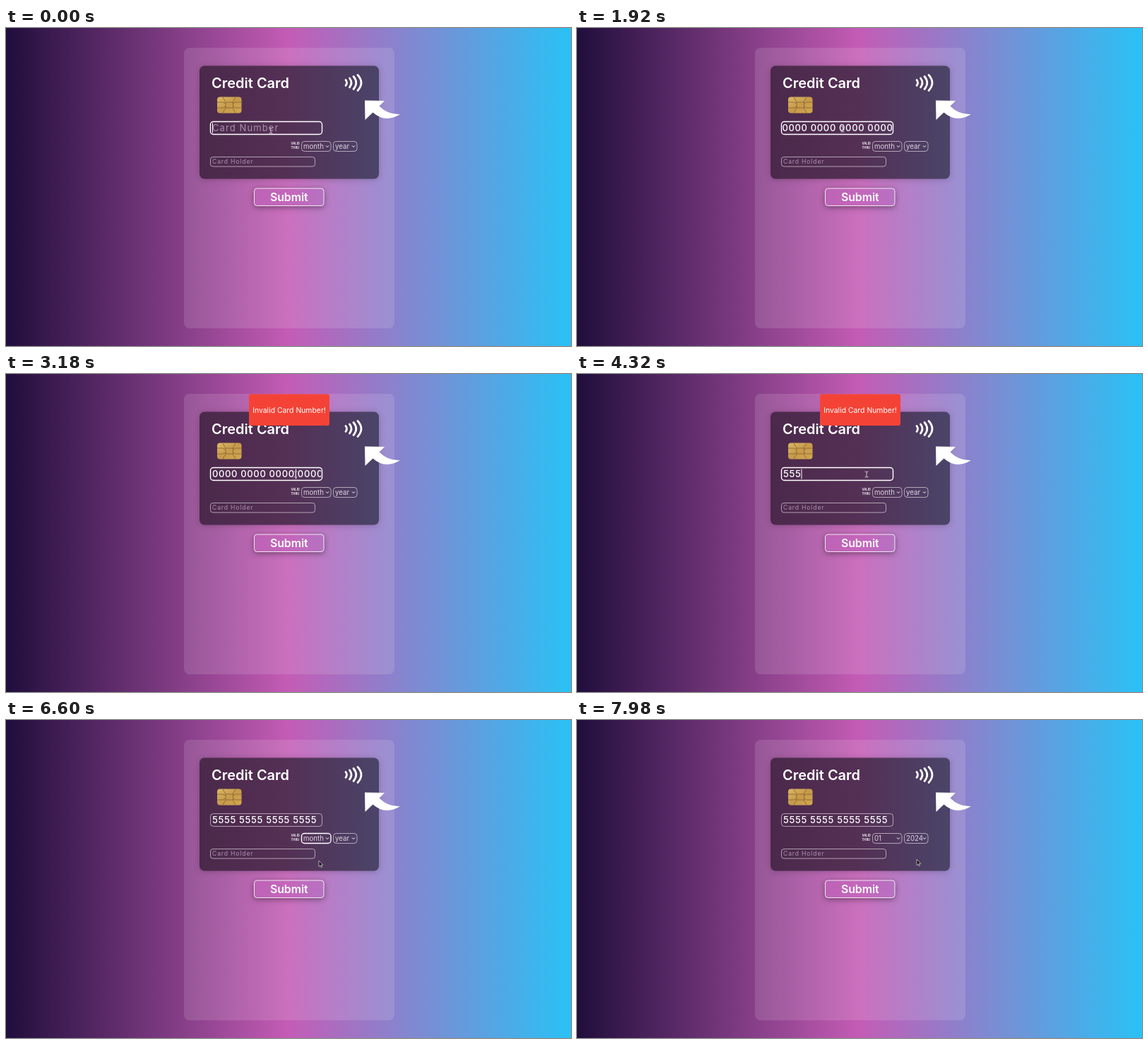
Write an HTML page that moves like this. It is 800 px wide and 450 px high and loops after 8000 ms.

```html
<!DOCTYPE html>
<html lang="en">
<head>
<meta charset="utf-8">
<title>Credit card form</title>
<style>
  html, body { margin: 0; width: 100%; height: 100%; overflow: hidden; }
  svg { display: block; width: 100vw; height: 100vh; }
  text { font-family: Inter, "Noto Sans", sans-serif; fill: #fff; }
  .bold { font-weight: 600; }
  .tiny { font-size: 4.2px; font-weight: 600; }
  .option { font-size: 9.7px; fill: #ddd3df; }
  .number { font-size: 13px; font-weight: 500; letter-spacing: .65px; }
  .number.empty { font-weight: 400; letter-spacing: 1.1px; }
  .empty { fill: #a88fac; }
  .field { fill: none; stroke: #fff; stroke-opacity: .55; }
  .field.focus { stroke-opacity: 1; stroke-width: 1.4; }
  #card { filter: drop-shadow(0 1px 4px #0003); }
  #button { filter: drop-shadow(0 2px 4px #0006); }
</style>
</head>
<body>
<svg viewBox="0 0 800 450">
  <defs>
    <linearGradient id="sky">
      <stop stop-color="#200e3c"/><stop offset=".5" stop-color="#c45cb5"/><stop offset="1" stop-color="#2ac1f5"/>
    </linearGradient>
    <linearGradient id="dark">
      <stop stop-color="#4b294b"/><stop offset=".5" stop-color="#543055"/><stop offset="1" stop-color="#4b4469"/>
    </linearGradient>
    <linearGradient id="pink">
      <stop stop-color="#bd63b6"/><stop offset=".5" stop-color="#c566bc"/><stop offset="1" stop-color="#b672c2"/>
    </linearGradient>
    <linearGradient id="gold" x2="1" y2="1">
      <stop stop-color="#dcb864"/><stop offset=".5" stop-color="#c69a4b"/><stop offset="1" stop-color="#d2a850"/>
    </linearGradient>
    <clipPath id="inside"><rect x="291" y="133" width="155" height="17"/></clipPath>
  </defs>

  <rect width="800" height="450" fill="url(#sky)"/>
  <rect x="252" y="28" width="298" height="397" rx="8" fill="#fff" fill-opacity=".12"/>
  <rect id="card" x="274" y="53.5" width="254" height="160" rx="7" fill="url(#dark)"/>

  <text class="bold" x="291" y="84.5" font-size="20">Credit Card</text>
  <g fill="none" stroke="#fff" stroke-width="2.8" stroke-linecap="round">
    <path d="M481 73.5q3 4 0 8M486.5 71q5 6.500 0 13M492 68.500q7.500 9 0 18M498 66.500q10 11 0 22"/>
  </g>
  <rect x="299" y="97.500" width="34.500" height="23" rx="4" fill="url(#gold)"/>
  <path d="M311 105h10.500v8H311zM299 105h8l4 2M299 113h8l4-2M333 105h-8l-4 2M333 113h-8l-4-2M307 98l4 7M325 98l-4 7M307 120l4-7M325 120l-4-7"
    fill="none" stroke="#80602f" stroke-width=".8"/>
  <path d="M508 102.500L536 103L528.500 110.500Q541 123 558 122Q537 135 519.500 119.500L508.500 130Z" fill="#fff"/>

  <rect id="numberBox" class="field" x="289.500" y="132.500" width="158" height="18" rx="4"/>
  <g clip-path="url(#inside)">
    <text id="number" class="number" x="292" y="146"></text>
  </g>
  <path id="caret" d="M0 134.500v14" stroke="#fff"/>

  <text class="tiny" x="403.500" y="164.500">VALID</text>
  <text class="tiny" x="403.500" y="171">THRU</text>
  <rect id="monthBox" class="field" x="418.500" y="160.500" width="41.500" height="14" rx="4"/>
  <text id="month" class="option" x="421" y="171"></text>
  <rect id="yearBox" class="field" x="463.500" y="160.500" width="33.500" height="14" rx="4"/>
  <text id="year" class="option" x="466" y="171"></text>
  <path d="M453 166.500l2 2 2-2M490 166.500l2 2 2-2" fill="none" stroke="#fff"/>
  <rect class="field" x="289.500" y="182.500" width="148" height="13.500" rx="3.500"/>
  <text class="empty" x="292" y="192.300" font-size="8.600" letter-spacing=".85">Card Holder</text>

  <rect id="button" x="351.500" y="227" width="98.500" height="24.500" rx="4" fill="url(#pink)" stroke="#fff" stroke-opacity=".85"/>
  <text class="bold" x="400.800" y="244.500" font-size="15.800" text-anchor="middle">Submit</text>

  <g id="toast">
    <rect x="344" y="28.500" width="114" height="44.500" rx="3" fill="#f44336"/>
    <text x="401" y="54.500" font-size="10.400" text-anchor="middle">Invalid Card Number!</text>
  </g>

  <g id="pointer">
    <path id="arrow" d="M0 -4v8.500l2-1.800 1.300 3 1.200-.6-1.300-2.900h2.600z" fill="#151018" stroke="#ddd" stroke-width=".7"/>
    <path id="beam" d="M-2.500-4q2.500 0 2.500 1.500Q0-4 2.500-4M0-3v6M-2.500 4Q0 4 0 2.500Q0 4 2.500 4" fill="none" stroke="#c3b5c4" stroke-width="1.100"/>
  </g>
</svg>
<script>
const DURATION = 8000, STEP = 60;
const KEY_INTERVAL = 75;
const ZEROS_START = 250, FIVES_START = 4160, CLEARED = 3900;
const $ = id => document.getElementById(id);
const between = (t, from, to) => t >= from && t < to;
const show = (id, visible) => $(id).setAttribute("visibility", visible ? "visible" : "hidden");

// Pointer stops: time, x, y
const stops = [
  [0, 375, 145], [1920, 376, 143], [2220, 480, 139], [2580, 480, 139],
  [2940, 410, 142], [5310, 410, 142], [5520, 480, 138], [5760, 480, 138],
  [6060, 440, 168], [6300, 440, 168], [6540, 443, 203], [6780, 443, 203],
  [7080, 480, 169], [7380, 480, 169], [7680, 481, 201], [DURATION, 481, 201]
];

function pointerAt(t) {
  const next = stops.findIndex(stop => stop[0] > t);
  const [t0, x0, y0] = stops[next - 1], [t1, x1, y1] = stops[next];
  const p = (t - t0) / (t1 - t0), eased = p * p * (3 - 2 * p);
  return [x0 + (x1 - x0) * eased, y0 + (y1 - y0) * eased];
}

function typed(digit, start, t) {
  const count = Math.max(0, Math.min(16, Math.floor((t - start) / KEY_INTERVAL) + 1));
  return digit.repeat(count).replace(/(.{4})(?=.)/g, "$1 ");
}

function draw(t) {
  const value = t < CLEARED ? typed("0", ZEROS_START, t) : typed("5", FIVES_START, t);
  const focused = t < 2400 || between(t, 3000, 5520);
  const caretOn = t < 2400 || between(t, 3000, 5640);
  const replaced = between(t, 3000, CLEARED);
  const scroll = value.length === 19 && caretOn && !replaced ? 1.5 : 0;

  const number = $("number");
  number.textContent = value || "Card Number";
  number.setAttribute("class", value ? "number" : "number empty");
  number.setAttribute("x", 292 - scroll);
  $("numberBox").classList.toggle("focus", focused);

  const end = value ? 292 + number.getComputedTextLength() : 292;
  const caretX = replaced ? 410.5 : Math.min(444.5, end + .5);
  const lastEdit = [0, ZEROS_START + 15 * KEY_INTERVAL, 3000, CLEARED, FIVES_START + 15 * KEY_INTERVAL]
    .filter(time => time <= t).pop();
  const typing = between(t, ZEROS_START, 1375) || between(t, FIVES_START, 5285);
  $("caret").setAttribute("transform", `translate(${caretX})`);
  show("caret", caretOn && (typing || (t - lastEdit) % 1000 < 500));

  $("month").textContent = t < 6720 ? "month" : "01";
  $("year").textContent = t < 7740 ? "year" : "2024";
  $("monthBox").classList.toggle("focus", between(t, 6120, 7140));
  $("yearBox").classList.toggle("focus", between(t, 7140, 7800));
  show("toast", between(t, 2460, 6000));

  const [x, y] = pointerAt(t);
  const overNumber = between(x, 289, 448) && between(y, 132, 151);
  $("pointer").setAttribute("transform", `translate(${x} ${y})`);
  show("beam", overNumber);
  show("arrow", !overNumber);
}

function frame() {
  draw(Math.floor(performance.now() % DURATION / STEP) * STEP);
  requestAnimationFrame(frame);
}
frame();
</script>
</body>
</html>
```
